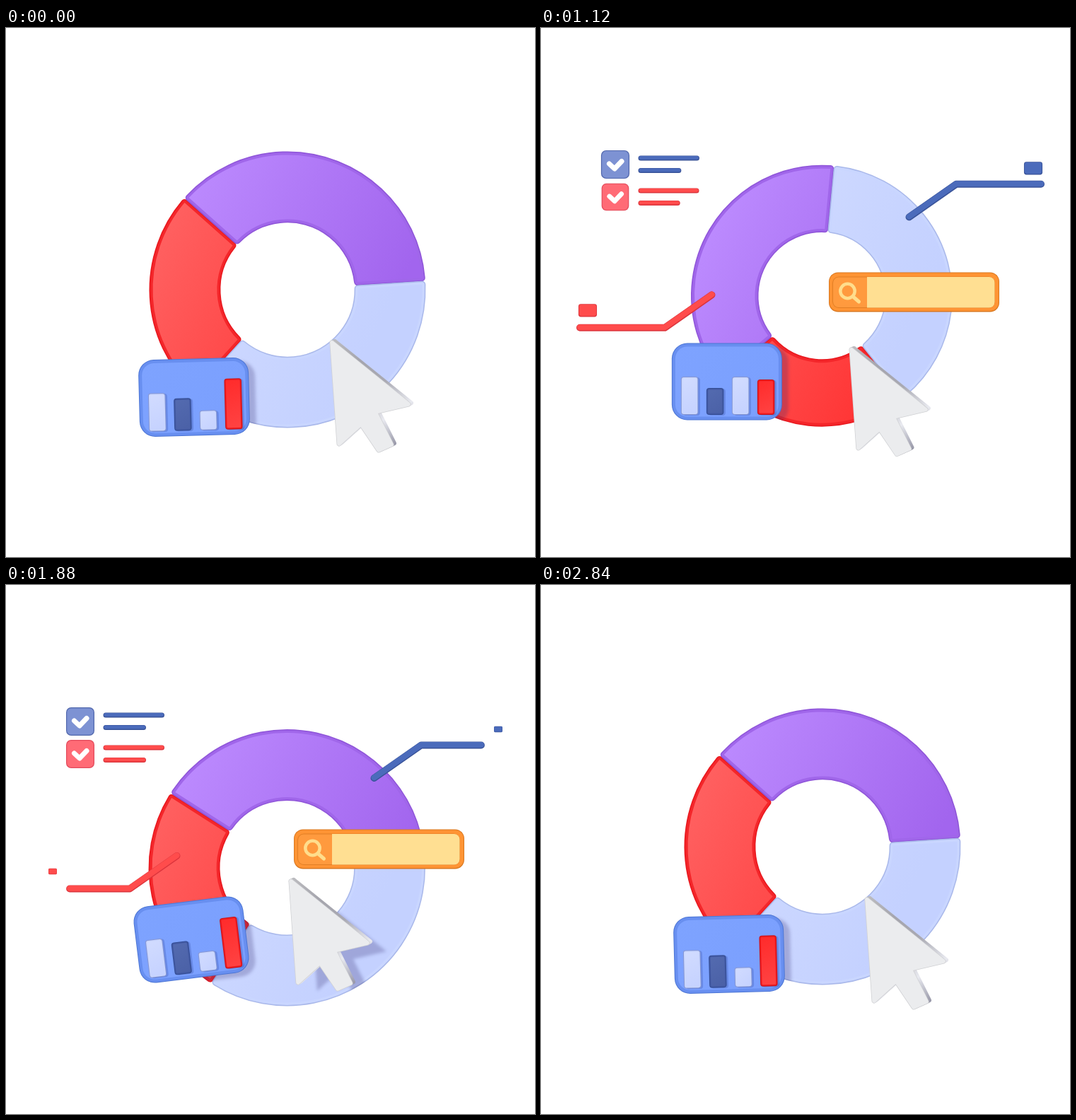
Write an HTML page with a canvas that moves like this. It is 748x748 px and loops after 2880 ms.

```html
<!DOCTYPE html>
<html lang="en">
<head>
<meta charset="utf-8">
<title>Dashboard</title>
<style>
  html, body { margin: 0; width: 100%; height: 100%; overflow: hidden; background: #fff; }
  canvas { display: block; width: 748px; height: 748px; }
</style>
</head>
<body>
<canvas id="stage" width="748" height="748"></canvas>
<script>
const ctx = document.getElementById('stage').getContext('2d');
const LOOP = 2880, STEP = 40, END = LOOP - STEP;
const RAD = Math.PI / 180;
ctx.lineJoin = ctx.lineCap = 'round';

const ramp = (t, from, to) => Math.min(1, Math.max(0, (t - from) / (to - from)));
const ease = (t, from, to) => {
  const u = ramp(t, from, to);
  return u * u * (3 - 2 * u);
};
// A base value changed by eased moves, each [delta, from, to].
const glide = (base, ...moves) => t =>
  moves.reduce((sum, [delta, from, to]) => sum + delta * ease(t, from, to), base);
const pulse = (delta, peak) => [[delta, peak - 280, peak], [-delta, peak, peak + 280]];

// Springs in at one time, swells and shrinks away at another.
function pop(t, from, to) {
  if (t <= from) return 0;
  const age = t - from, u = ramp(t, to, to + 300);
  return 1 - Math.exp(-age * .011) * Math.cos(age * 2 * Math.PI / 320) - u * u * (3.2 * u - 2.2);
}

const ring = {
  x: glide(398, [-2, 840, 1400], [2, 1700, 2000]),
  y: glide(370, [33, 140, 620], [-27, 620, 1240], [30, 1640, 1980], [-36, 1980, 2600]),
  r: glide(195.5, [-29, 560, 840], [37, 840, 1400], [-8, 1700, 1900]),
  turn: glide(0, [-81, 380, 1120], [-288, 1120, 1830], [9, 2200, 2700])
};
const callouts = {
  y: glide(245, [45, 120, 780], [-52, 800, 1500], [49, 1660, 2000], [-42, 2000, 2560]),
  length: t => 201 * (ramp(t, 95, 765) - ramp(t, 1763, 2433)),
  tag: t => 1 - (1 - ramp(t, 757, 1324)) ** 2 - ramp(t, 1760, 1960)
};
const card = {
  x: glide(266, [-4, 0, 1600], [4, 2160, END]),
  y: glide(522, [-24, 0, 360], [40, 360, 840], [-38, 840, 1120], [16, 1120, 1600],
    [-29, 1600, 2160], [35, 2160, END]),
  angle: glide(-1.5, [-6.7, 0, 360], [13.2, 360, 840], [-5, 840, 1120], [-7, 1120, 1600], [5.5, 2160, END]),
  bars: [
    glide(54, ...pulse(10, 840)),
    glide(46, ...pulse(-8, 1120), ...pulse(7, 1600)),
    glide(28, ...pulse(26, 1120), ...pulse(-7, 1600)),
    glide(72, ...pulse(-22, 1120))
  ]
};
const search = {
  scale: glide(0, [1.11, 100, 440], [-.28, 480, 840], [.17, 840, 1120], [-1, 2300, 2580]),
  angle: glide(-8, [-2, 360, 840], [10, 840, 1120])
};
const cursor = {
  x: glide(459, [-23, 0, 360], [27, 360, 820], [-63, 820, 1500], [59, 1800, END]),
  y: glide(442, [-64, 0, 360], [74, 640, 1120], [-36, 1160, 1560], [26, 2200, END]),
  scale: glide(1, [-.04, 560, 840], [.04, 840, 1600]),
  lift: glide(.3, [.7, 0, 360], [-.7, 360, 840], [.7, 1120, 1600], [-.7, 2160, END])
};

const PURPLE = { edge: '#8f55d8', mid: '#a066ea', from: '#bd8cff', to: '#a265ee' };
const RED = { edge: '#e8181e', mid: '#f4262a', from: '#ff6262', to: '#ff3434' };
const LAVENDER = { edge: '#a9b8ea', mid: '#c9d6ff', from: '#d2dcff', to: '#c4d1ff' };
const NAVY = { edge: '#344d92', mid: '#435aa4', from: '#546bb0', to: '#4a60a6' };
const SKY = { edge: '#4d76d4', mid: '#688ff0', from: '#7ea3ff', to: '#7a9ffe' };
const BAR_LIGHT = { ...LAVENDER, edge: '#8797d2' };
const BAR_RED = { edge: '#c8141c', mid: '#f01c20', from: '#ff2a2a', to: '#ff4444' };
const BLUE_LINE = ['#385298', '#4b6bbb'];
const RED_LINE = ['#db343c', '#ff4c4c'];

function at(x, y, angle, scale, draw) {
  ctx.save();
  ctx.translate(x, y);
  ctx.rotate(angle * RAD);
  ctx.scale(scale, scale);
  draw();
  ctx.restore();
}

function box(x, y, w, h, r) {
  const path = new Path2D();
  path.roundRect(x, y, w, h, r);
  return path;
}

function poly(...points) {
  const path = new Path2D();
  points.forEach(([x, y], i) => i ? path.lineTo(x, y) : path.moveTo(x, y));
  return path;
}

function fill(path, color) {
  ctx.fillStyle = color;
  ctx.fill(path);
}

function stroke(path, color, width) {
  ctx.strokeStyle = color;
  ctx.lineWidth = width;
  ctx.stroke(path);
}

function blend(colors, x0, y0, x1, y1) {
  const g = ctx.createLinearGradient(x0, y0, x1, y1);
  colors.forEach((color, i) => g.addColorStop(i / (colors.length - 1), color));
  return g;
}

function softBox(x, y, w, h, r, tone, bevel) {
  const layer = (inset, color) =>
    fill(box(x + inset, y + inset, w - 2 * inset, h - 2 * inset, Math.max(1, r - inset)), color);
  layer(0, tone.edge);
  layer(1, tone.mid);
  layer(bevel, blend([tone.from, tone.to], x, y, x + w, y + h));
}

function segment(from, to, r, tone) {
  const inset = 5, outer = r - inset, inner = r * .484 + inset;
  const pad = radius => Math.asin((inset - .3) / radius);
  const path = new Path2D();
  path.arc(0, 0, outer, from * RAD + pad(outer), to * RAD - pad(outer));
  path.arc(0, 0, inner, to * RAD - pad(inner), from * RAD + pad(inner), true);
  path.closePath();
  stroke(path, tone.edge, 10);
  stroke(path, tone.mid, 7);
  fill(path, blend([tone.from, tone.to], -r, -r * .4, r * .6, r * .4));
}

function drawRing(t) {
  const r = ring.r(t);
  at(ring.x(t), ring.y(t), ring.turn(t), 1, () => {
    // Light stays fixed while the segments turn.
    const turn = ring.turn(t);
    ctx.rotate(-turn * RAD);
    segment(132.3 + turn, 221.6 + turn, r, RED);
    segment(221.6 + turn, 356.4 + turn, r, PURPLE);
    segment(356.4 + turn, 492.3 + turn, r, LAVENDER);
  });
}

const ARROW = poly([2, 3], [110, 90], [63, 101], [86, 147], [68, 155], [43, 118], [12, 146], [2, 3]);
const CARD = box(-78, -54.5, 156, 109, 22);

function drawShadows(t) {
  const x = ring.x(t), y = ring.y(t), r = ring.r(t), lift = cursor.lift(t);
  const shadow = 'rgba(50,40,110,.25)';
  const hoop = new Path2D();
  hoop.arc(x, y, r, 0, 7);
  hoop.closePath();
  hoop.moveTo(x + r * .484, y);
  hoop.arc(x, y, r * .484, 0, 7);
  ctx.save();
  ctx.clip(hoop, 'evenodd');
  ctx.filter = 'blur(2px)';
  at(card.x(t) + 9, card.y(t) + 5, card.angle(t), 1, () => fill(CARD, shadow));
  at(cursor.x(t) + 27 * lift, cursor.y(t) + 12 * lift, 0, cursor.scale(t), () => fill(ARROW, shadow));
  ctx.restore();
}

function rod(points, [edge, face], width) {
  const path = poly(...points);
  stroke(path, edge, width);
  at(0, -.6, 0, 1, () => stroke(path, face, width - 2));
}

// dir is the side the callout runs to: 1 is right and up, -1 is left and down.
function callout(x, y, dir, tagX, tagY, colors, t) {
  const length = callouts.length(t), scale = callouts.tag(t);
  if (length <= 0) return;
  const slant = Math.min(1, length / 81), run = Math.max(0, length - 81);
  const tipX = x + dir * 66.5 * slant, tipY = y - dir * 46.5 * slant;
  rod([[x, y], [tipX, tipY], [tipX + dir * run, tipY]], colors, 10);
  if (scale > 0) at(tagX, tagY, 0, scale, () => {
    fill(box(-15, -10.5, 30, 21, 4), colors[0]);
    fill(box(-14, -9.5, 28, 18.5, 3.5), colors[1]);
  });
}

function drawCallouts(t) {
  const y = callouts.y(t);
  callout(520.5, y, 1, 696, y - 69, BLUE_LINE, t);
  callout(241.5, y + 110, -1, 66, y + 132, RED_LINE, t);
}

function drawCard(t) {
  at(card.x(t), card.y(t), card.angle(t), 1, () => {
    softBox(-78, -54.5, 156, 109, 22, SKY, 5);
    [BAR_LIGHT, NAVY, BAR_LIGHT, BAR_RED].forEach((tone, i) => {
      const h = card.bars[i](t), x = -65 + 36 * i;
      fill(box(x + 3, 48 - h, 24, h, 4), 'rgba(45,65,150,.25)');
      softBox(x, 47 - h, 24.5, h, 4, tone, 2.5);
    });
  });
}

function checkbox(y, scale, edge, face) {
  if (scale <= 0) return;
  at(105, y, 0, scale, () => {
    fill(box(-20, -20, 40, 40, 7), edge);
    fill(box(-18.8, -18.8, 37.6, 37.6, 6), face);
    stroke(poly([-8.5, -1], [-1, 6], [9, -4.5]), '#fff', 7);
  });
}

function listLine(y, length, scale, colors) {
  const end = length * scale - 6.5;
  if (end > 0) rod([[141, y], [141 + end, y]], colors, 7);
}

function drawChecklist(t) {
  checkbox(193, pop(t, 625, 2020), '#5268ad', '#7d92d3');
  checkbox(239, pop(t, 833, 2160), '#e24b5c', '#ff6b76');
  listLine(184, 86, pop(t, 540, 1902), BLUE_LINE);
  listLine(201.5, 60, pop(t, 650, 1974), BLUE_LINE);
  listLine(230, 86, pop(t, 740, 2025), RED_LINE);
  listLine(247.5, 60, pop(t, 780, 2160), RED_LINE);
}

function drawSearch(t) {
  const scale = search.scale(t);
  if (scale < .01) return;
  at(436, 373.5, search.angle(t), scale, () => {
    fill(box(-29, -28, 241, 56, 13), '#d97820');
    fill(box(-28, -27, 239, 53.5, 12), '#ff9434');
    fill(box(-24, -22, 230, 44.5, 9), '#e07e25');
    fill(box(-23, -21, 48, 42.5, [8, 0, 0, 8]), '#ff9a3e');
    fill(box(25, -21.5, 180.5, 43.5, [0, 8, 8, 0]), '#ffdf92');
    const lens = new Path2D();
    lens.arc(-2.5, -1.5, 10.2, 0, 7);
    stroke(lens, '#ffdd8c', 4.5);
    stroke(poly([6, 7], [13.5, 13.5]), '#ffdd8c', 5);
  });
}

function drawCursor(t) {
  at(cursor.x(t), cursor.y(t), 0, cursor.scale(t), () => {
    const side = blend(['#bcbcc0', '#a5a5ad', '#a9a9b2', '#e9eaf0', '#8a8a9c'], 0, 0, 98, 150);
    for (let i = 4; i > 0; i--) at(i, -i / 2, 0, 1, () => stroke(ARROW, side, 6));
    stroke(ARROW, '#cfd0d3', 7);
    stroke(ARROW, '#ebecee', 5.5);
    fill(ARROW, '#ebecee');
  });
}

function render(now) {
  const t = Math.floor(now % LOOP / STEP) * STEP;
  ctx.fillStyle = '#fff';
  ctx.fillRect(0, 0, 748, 748);
  [drawRing, drawShadows, drawCallouts, drawChecklist, drawCard, drawSearch, drawCursor]
    .forEach(draw => draw(t));
}

const start = performance.now();
function frame() {
  render(performance.now() - start);
  requestAnimationFrame(frame);
}
frame();
</script>
</body>
</html>
```
